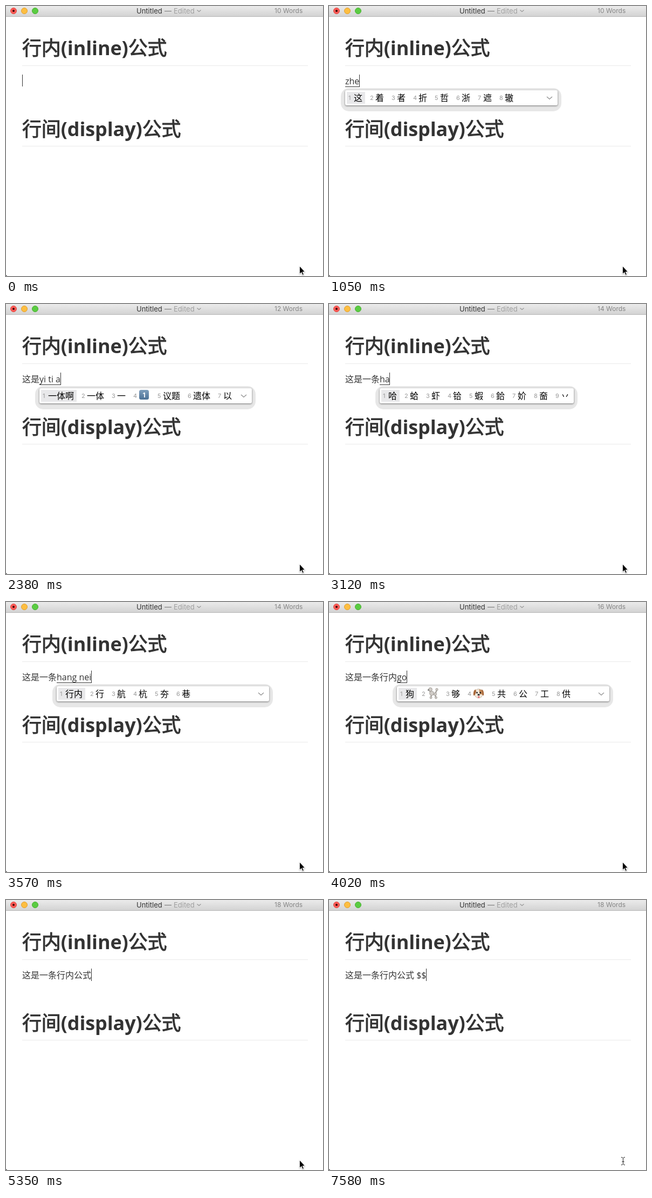
Recreate the animation shown at these times as an HTML page. Size 588 px wide and 500 px high, loop 8 s.

```html
<!DOCTYPE html>
<html lang="zh-CN">
<head>
<meta charset="utf-8">
<title>Untitled</title>
<style>
  html, body { margin: 0; width: 100%; height: 100%; overflow: hidden; background: #fff; }
  svg { display: block; width: 588px; height: 500px; }
  text { white-space: pre; }
  .doc { font: 16px "Open Sans", "Noto Sans CJK SC", "Noto Sans CJK", sans-serif; fill: #333; }
  .head { font-size: 36px; font-weight: 700; letter-spacing: -.13px; }
  .han { font-weight: 400; stroke: #333; stroke-width: 1px; }
  .ui { font: 13px Inter, Roboto, sans-serif; }
  .cand { font: 16px "Noto Sans CJK SC", "Noto Sans CJK", sans-serif; fill: #000; }
  .num { font: 11px Inter, Roboto, sans-serif; fill: #999; }
  .panel { filter: drop-shadow(0 1px 1.5px rgba(0, 0, 0, .5)); }
  #arrow { filter: drop-shadow(0 1px 1px rgba(0, 0, 0, .3)); }
</style>
</head>
<body>
<svg viewBox="0 0 588 500" xmlns="http://www.w3.org/2000/svg">
  <defs>
    <linearGradient id="bar" x2="0" y2="1">
      <stop stop-color="#ebebeb"/><stop offset="1" stop-color="#d3d3d3"/>
    </linearGradient>
    <linearGradient id="key" x2="0" y2="1">
      <stop stop-color="#7f9fbd"/><stop offset="1" stop-color="#4c7196"/>
    </linearGradient>
    <g id="keycap">
      <rect x="1" y="159" width="18" height="18" rx="3.5" fill="url(#key)"/>
      <text x="10" y="172.5" text-anchor="middle" fill="#fff" font-family="Inter, sans-serif" font-size="12" font-weight="700">1</text>
    </g>
    <g id="poodle">
      <path d="M5 165 L8 171 L15 171 L16 178 M8 171 L7 178 M15 170 L18 163" fill="none" stroke="#a9a5a0" stroke-width="2.4" stroke-linecap="round"/>
      <g fill="#d0ccc7" stroke="#99948f" stroke-width=".8">
        <circle cx="6" cy="162" r="3.4"/><circle cx="8.5" cy="169" r="4"/>
        <circle cx="18" cy="162" r="2.2"/><circle cx="15" cy="170.5" r="2.6"/>
        <circle cx="7" cy="177" r="2"/><circle cx="16.5" cy="177" r="2"/>
      </g>
      <path d="M1 163h3" stroke="#555" stroke-width="1.5"/>
    </g>
    <g id="puppy">
      <ellipse cx="10.5" cy="169.5" rx="7.8" ry="8.5" fill="#f3e9dc" stroke="#b79c82" stroke-width=".7"/>
      <path d="M5 162 Q0 163 1 173 Q4 174 6 166Z M16 162 Q21 163 20 173 Q17 174 15 166Z" fill="#a8683a"/>
      <path d="M11.5 162 Q17 161 17.5 170 Q13 173 12 168Z" fill="#c48a58"/>
      <circle cx="7.5" cy="168" r="1.4" fill="#222"/><circle cx="13.8" cy="168" r="1.4" fill="#222"/>
      <ellipse cx="10.6" cy="171.7" rx="2.2" ry="1.5" fill="#222"/>
      <path d="M9 174.5h3.4v1.5a1.7 1.7 0 0 1-3.4 0z" fill="#e66d78"/>
    </g>
  </defs>

  <rect width="588" height="500" fill="#fff"/>
  <rect width="588" height="19" fill="url(#bar)"/>
  <rect y="19" width="588" height="1" fill="#b5b5b5"/>
  <g stroke-width="1">
    <circle cx="14" cy="9" r="5.5" fill="#fc5b57" stroke="#e2463f"/>
    <circle cx="34" cy="9" r="5.5" fill="#fdbe41" stroke="#e0a032"/>
    <circle cx="54" cy="9" r="5.5" fill="#5bcc42" stroke="#48b032"/>
  </g>
  <circle cx="14" cy="9" r="2" fill="#3c0000"/>
  <g class="ui">
    <text x="242" y="14" fill="#333">Untitled</text>
    <text x="294" y="14" fill="#777">—</text>
    <text x="311" y="14" fill="#a0a0a0">Edited</text>
    <text id="count" x="498" y="13" fill="#858585" style="font-size:12px"></text>
  </g>
  <path d="M354.5 7.5l3.5 3 3.5-3" fill="none" stroke="#999" stroke-width="1.3"/>

  <text class="doc head" x="30" y="91"><tspan class="han">行内</tspan>(inline)<tspan class="han">公式</tspan></text>
  <rect x="30" y="110" width="530" height="1" fill="#eaeaea"/>
  <text class="doc head" x="30" y="241"><tspan class="han">行间</tspan>(display)<tspan class="han">公式</tspan></text>
  <rect x="30" y="259" width="530" height="1" fill="#eaeaea"/>

  <text id="line" class="doc" x="30" y="145"></text>
  <text id="typed" class="doc" y="145"></text>
  <rect id="under" y="149" height="1" fill="#333"/>
  <rect id="caret" y="127" width="1" fill="#333"/>
  <g id="popup"></g>

  <path d="M0 497.5Q.5 499.5 2.5 500H0Z" fill="#222"/>
  <path id="arrow" d="M544.5 481.5v15l3.4-3.2 2.2 5.1 2.4-1-2.2-4.9h4.4z" fill="#000" stroke="#fff"/>
  <path id="beam" d="M542 476.5h2l1.5 1.5 1.5-1.5h2M545.5 478v11M542 490.5h2l1.5-1.5 1.5 1.5h2M543.5 484.5h4" fill="none" stroke="#222"/>
</svg>
<script>
const LOOP = 8000, NS = "http://www.w3.org/2000/svg";
const PHRASE = "这是一条行内公式";
const EMOJI = { K: "keycap", P: "poodle", D: "puppy" };
const $ = id => document.getElementById(id);

// [start, committed length, pinyin, candidates, caret hidden, tail]
const steps = [
  [0, 0],
  [450, 0, "", "", 1],
  [900, 0, "zh", "这 中 着 只 之 种 知 找"],
  [1050, 0, "zhe", "这 着 者 折 哲 浙 遮 辙"],
  [1190, 0, "zhe sh", "这是 这时 这事 折射 这 着"],
  [1340, 0, "zhe shi", "这是 这时 这事 这 着 者"],
  [1790, 2],
  [2080, 2, "yi", "一 K 以 已 意 亿 易 衣"],
  [2230, 2, "yi t", "一天 一条 一套 一 K 以"],
  [2380, 2, "yi ti a", "一体啊 一体 一 K 议题 遗体 以"],
  [2530, 2, "yi tiao", "一条 一跳 一挑 一 K 以"],
  [2680, 4],
  [3120, 4, "ha", "哈 蛤 虾 铪 蝦 鉿 妎 奤 丷"],
  [3270, 4, "hang", "行 航 杭 夯 巷 吭 绗 沆"],
  [3420, 4, "hang n", "行内 行 航 杭 夯 巷"],
  [3570, 4, "hang nei", "行内 行 航 杭 夯 巷"],
  [3720, 6],
  [4020, 6, "go", "狗 P 够 D 共 公 工 供"],
  [4160, 6, "gong", "公 工 共 功 供 宫 攻 弓"],
  [4300, 6, "gong sh", "公式 公社 公示 工时 攻势 公"],
  [4450, 6, "gong shi", "公式 公示 工时 攻势 公事 公"],
  [5050, 6, "gong shi", "公式 公示 工时 攻势 公事 公", 1],
  [5350, 8],
  [5800, 8, "", "", 1],
  [6250, 8],
  [6550, 8, "", "", 0, " "],
  [6990, 8, "", "", 1, " "],
  [7430, 8, "", "", 0, " $"],
  [7580, 8, "", "", 0, " $$"]
];
const BEAM_AT = 6690;

function add(parent, tag, attrs, text) {
  const el = document.createElementNS(NS, tag);
  for (const k in attrs) el.setAttribute(k, attrs[k]);
  if (text) el.textContent = text;
  parent.append(el);
  return el;
}

function drawPopup(left, list) {
  const box = $("popup");
  box.replaceChildren();
  if (!list) return;
  const items = list.split(" ");
  const more = items.length < 9;
  const width = more ? 394 : 360;
  add(box, "rect", { x: left - 8, y: 152, width: width + 15, height: 43, rx: 15, fill: "#e7e7e7" });
  add(box, "rect", { x: left, y: 156, width, height: 28, rx: 3, fill: "#fff", class: "panel" });
  let x = left + 6;
  items.forEach((item, i) => {
    const icon = EMOJI[item];
    const w = icon ? 21 : item.length * 16;
    if (!i) add(box, "rect", { x: x - 3, y: 159, width: w + 18, height: 22, fill: "#e8e8ea" });
    add(box, "text", { x, y: 174, class: "num" }, String(i + 1));
    if (icon) add(box, "use", { href: "#" + icon, x: x + 10 });
    else add(box, "text", { x: x + 10, y: 175.5, class: "cand" }, item);
    x += w + 24;
  });
  if (more) add(box, "path", {
    d: `M${left + width - 20} 168l5 4.5 5-4.5`, fill: "none", stroke: "#8c8c8c", "stroke-width": 1.2
  });
}

function show([, count, pinyin = "", list, hidden, tail = ""]) {
  const start = 30 + count * 16;
  $("count").textContent = 10 + count + " Words";
  $("line").textContent = PHRASE.slice(0, count) + tail;
  $("typed").textContent = pinyin;
  $("typed").setAttribute("x", start);
  const typedWidth = pinyin ? $("typed").getComputedTextLength() : 0;
  const tailWidth = tail ? $("line").getComputedTextLength() - count * 16 : 0;
  const end = Math.floor(start + typedWidth + tailWidth + .05);
  $("under").setAttribute("x", start);
  $("under").setAttribute("width", pinyin ? end - start : 0);
  $("caret").setAttribute("x", end);
  $("caret").setAttribute("height", count || pinyin ? 23 : 22);
  $("caret").style.display = hidden ? "none" : "";
  drawPopup(start, list);
}

let current;
function tick(now) {
  const t = now % LOOP;
  const step = steps.findLast(s => s[0] <= t);
  if (step !== current) show(current = step);
  $("arrow").style.display = t < BEAM_AT ? "" : "none";
  $("beam").style.display = t < BEAM_AT ? "none" : "";
  requestAnimationFrame(tick);
}
tick(performance.now());
</script>
</body>
</html>
```
